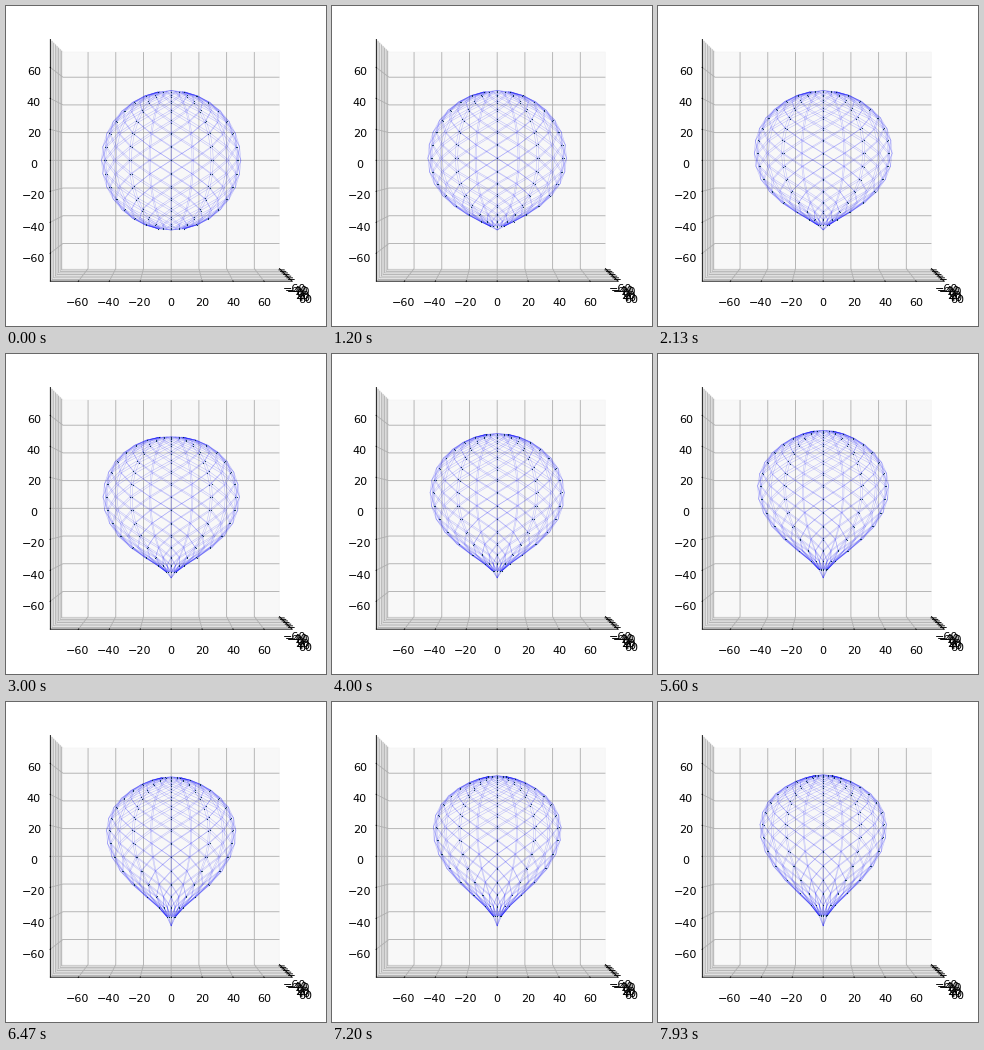
These frames come from a looping animation (320 by 320 pixels, 8 s). A matplotlib script:

```python
import numpy as np
import matplotlib.pyplot as plt
from matplotlib.animation import FuncAnimation
from mpl_toolkits.mplot3d.art3d import Line3DCollection

LOOP, FRAMES = 8000, 120
RADIUS, LIMIT = 47.7, 78.125
ROWS, LONS = 17, 20

plt.rcParams["path.snap"] = False

row = np.arange(ROWS)
u = row / (ROWS - 1)  # 0 at the tip, 1 at the top


def profile(p):
    """Radius and height of every row, from a sphere (p=0) to a teardrop (p=1)."""
    delay = 0.35 * u
    wave = np.clip((p - delay) / (1 - delay), 0, 1) ** 0.6
    lift = 8.2 * wave * (1 - np.exp(-row))
    bulge = 14.4 * p ** 1.2 * np.sin(np.pi * u ** 0.85) ** 2
    z = -RADIUS * np.cos(np.pi * u) + lift + bulge

    tip = 0.72 * (1 - np.exp(-p / 0.12)) * np.exp(-(row / 3.3) ** 2)
    top = 0.32 * wave[-1] * np.exp(-((ROWS - 1 - row) / 5) ** 2)
    shrink = 1 - 0.07 * p ** 1.5
    r = RADIUS * np.sin(np.pi * u) * shrink * (1 - tip) * (1 - top)
    return r, z


def strand(r, z, start, turn=0):
    """Line from tip to top, moving `turn` longitudes per row."""
    lon = 2 * np.pi * (start + turn * row) / LONS
    return np.column_stack([r * np.cos(lon), r * np.sin(lon), z])


def meridians(r, z):
    return [strand(r, z, k) for k in range(0, LONS, 2)]


def web(r, z):
    """Strands that stop one row short of both poles."""
    diagonal = [strand(r, z, k, turn)[1:-1]
                for turn in (-1, 1) for k in range(LONS)]
    between = [strand(r, z, k)[1:-1] for k in range(1, LONS, 2)]
    return diagonal + between


fig = plt.figure(figsize=(4, 4), dpi=80)
ax = fig.add_axes([-0.1, -0.0985, 1.2, 1.2], projection="3d")
ax.set_box_aspect((1, 1, 1))
ax.view_init(elev=0, azim=0)
ax.set(xlim=(-LIMIT, LIMIT), ylim=(-LIMIT, LIMIT), zlim=(-LIMIT, LIMIT))
for axis in (ax.xaxis, ax.yaxis, ax.zaxis):
    axis.set_ticks(range(-60, 61, 20))

mesh = Line3DCollection(meridians(*profile(0)), colors="blue",
                        linewidths=0.5, alpha=0.22)
ax.add_collection3d(mesh)
dots, = ax.plot([], [], [], ".", ms=2, mew=0, color="#06304a", zorder=10)


def update(frame):
    r, z = profile(frame / FRAMES)
    columns = meridians(r, z)
    mesh.set_segments(columns + web(r, z))
    dots.set_data_3d(*np.vstack([c[1:-1] for c in columns]).T)
    return mesh, dots


anim = FuncAnimation(fig, update, frames=FRAMES, interval=LOOP / FRAMES,
                     init_func=lambda: update(0), repeat=True, repeat_delay=0)
plt.show()
```
